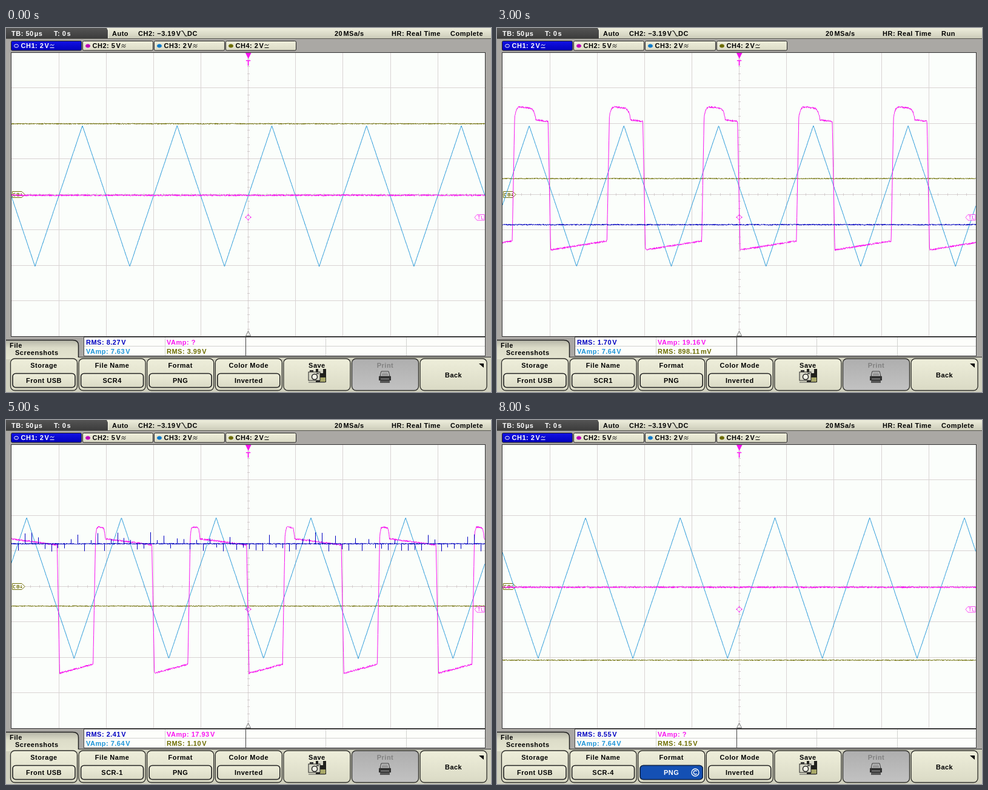
Animation, 800 px wide and 600 px high, one loop 9000 ms. Source, as an HTML page:

```html
<!DOCTYPE html>
<html lang="en">
<head>
<meta charset="utf-8">
<title>Oscilloscope PWM sweep</title>
<style>
html, body { margin: 0; width: 100%; height: 100%; overflow: hidden; background: #aaa8a4; }
svg { display: block; width: 800px; height: 600px; }
text { font: bold 11px "Liberation Sans", Arial, sans-serif; letter-spacing: .5px; fill: #000; white-space: pre; }
.mid { text-anchor: middle; }
.white { fill: #fff; }
.dim { fill: #808080; }
.big { font-size: 12.5px; }
.trace { fill: none; stroke-linejoin: round; }
.state { visibility: hidden; animation: show 9s step-end infinite; }
@keyframes show {
  0% { visibility: visible; }
  11.1111%, 100% { visibility: hidden; }
}
</style>
</head>
<body>
<svg id="scope" viewBox="0 0 800 600">
  <defs>
    <linearGradient id="beige" x2="0" y2="1">
      <stop offset="0" stop-color="#eeeeda"/><stop offset="1" stop-color="#dadac5"/>
    </linearGradient>
    <linearGradient id="tab" x2="0" y2="1">
      <stop offset="0" stop-color="#b4b4a6"/><stop offset=".4" stop-color="#dcdcc8"/><stop offset="1" stop-color="#e4e4d0"/>
    </linearGradient>
    <linearGradient id="bar" x2="0" y2="1">
      <stop offset="0" stop-color="#eeeedc"/><stop offset="1" stop-color="#ccccb9"/>
    </linearGradient>
    <linearGradient id="dark" x2="0" y2="1">
      <stop offset="0" stop-color="#545454"/><stop offset="1" stop-color="#3c3c3c"/>
    </linearGradient>
    <linearGradient id="blue" x2="0" y2="1">
      <stop offset="0" stop-color="#1212e4"/><stop offset="1" stop-color="#0000bc"/>
    </linearGradient>
    <linearGradient id="off" x2="0" y2="1">
      <stop offset="0" stop-color="#aeaeae"/><stop offset="1" stop-color="#c2c2c2"/>
    </linearGradient>
    <clipPath id="plot"><path d="M9 41H790V508H9Z"/></clipPath>
  </defs>
</svg>
<script>
const BLUE = '#0000c0', PINK = '#f814f0', CYAN = '#1c94d8', OLIVE = '#6c6c00';
const LEFT = 9, RIGHT = 790, TOP = 40, DIV_X = 78.125, DIV_Y = 58.5;
const PERIOD = 2 * DIV_X, EDGE = 87;      // EDGE: a triggered falling edge
const PEAK_Y = 161, SWING = 232;          // triangle carrier

let seed = 7;
function rand() {
  seed = (seed * 1664525 + 1013904223) >>> 0;
  return seed / 4294967296;
}
const mod = (a, b) => ((a % b) + b) % b;
const clamp = (v, lo, hi) => Math.min(hi, Math.max(lo, v));
const mix = (a, b, t) => a + (b - a) * t;
const voltsToY = v => 274.5 - v * DIV_Y / 2;
const showVolts = v => Math.abs(v) < 1
  ? (Math.abs(v) * 1000).toFixed(2) + '_mV' : Math.abs(v).toFixed(2) + '_V';

// "_" stands for a narrow gap
const label = (x, y, s, cls = '', fill = '') =>
  `<text x="${x}" y="${y}" class="${cls}"${fill && ` style="fill:${fill}"`}>` +
  s.split('_').map((part, i) => i ? `<tspan dx="1.2">${part}</tspan>` : part).join('') + '</text>';
const rect = (x, y, w, h, fill, extra = '') =>
  `<rect x="${x}" y="${y}" width="${w}" height="${h}" fill="${fill}" ${extra}/>`;
const line = (d, stroke, width = 1, extra = '') =>
  `<path d="${d}" fill="none" stroke="${stroke}" stroke-width="${width}" ${extra}/>`;

function trace(fn, color, noise) {
  let d = '';
  for (let x = LEFT; x <= RIGHT; x += .4) {
    const y = fn(x) + (rand() * 2 - 1) * noise;
    d += (d ? 'L' : 'M') + x.toFixed(1) + ' ' + y.toFixed(1);
  }
  return `<path class="trace" d="${d}" stroke="${color}"/>`;
}

const level = y => () => y;

function triangle(peak) {
  return x => {
    const p = mod(x - peak, PERIOD);
    return PEAK_Y + SWING * Math.min(p, PERIOD - p) / DIV_X;
  };
}

// Time from the carrier's peak to where it crosses the control level
const crossing = y => (y - PEAK_Y) / SWING * DIV_X;

// AC-coupled comparator output: low with droop, rise, high with an early kick, fall
function pulse(step, controlY) {
  const fallEnd = 1.5, fall = PERIOD - 2.7;
  const top = PERIOD - 2 * crossing(controlY) + 1.7 - .85 * step, rise = top - 4;
  const duty = (fall - top) / PERIOD, mean = 283;
  const kick = 25.5 + 9.5 * step, kickHeight = clamp((kick - 6) * 2, 0, 18);
  const low = p => mean + 214 * duty * (1 - .0021 * (p - rise / 2));
  const high = p => {
    const u = (p - top) / kick;
    const bump = u < 1 ? kickHeight * (1 - Math.pow(2 * u - 1, 6)) : 0;
    return mean - 205 * (1 - duty) + .13 * (p - (top + fall) / 2) - bump;
  };
  return x => {
    const p = mod(x - EDGE - fallEnd, PERIOD) + fallEnd;
    if (p < rise) return low(p);
    if (p < top) return mix(low(rise), high(top), (p - rise) / (top - rise));
    if (p < fall) return high(p);
    return mix(high(fall), low(fallEnd), (p - fall) / (PERIOD + fallEnd - fall));
  };
}

function spikes(y) {
  let d = '';
  for (let x = 20.5; x < RIGHT; x += 10.9) {
    const h = rand() < .5 ? -6 - 14 * rand() ** 2 : 6 + 7 * rand();
    d += `M${Math.floor(x) + .5} ${y}v${h.toFixed(1)}`;
  }
  return line(d, BLUE);
}

// Shown readings for steps 4 to -4: CH1 volts, CH4 volts, CH2 amplitude
const readings = [
  [-8.27, 3.99, '?'], [-6.2, 3.01, '18.69_V'], [-4.12, 2.04, '18.91_V'],
  [-1.7, .89811, '19.16_V'], [.3462, -.11735, '18.41_V'], [2.41, -1.1, '17.93_V'],
  [4.42, -2.09, '17.90_V'], [6.49, -3.12, '17.88_V'], [8.55, -4.15, '?'],
];

function topBar() {
  let s = rect(0, 0, 800, 17, 'url(#bar)') + line('M0 17.5H800', '#55554e') +
    '<path d="M0 0H166L168 4V17H0Z" fill="url(#dark)"/>' + line('M168.5 0V17', '#f8f8ec') +
    label(9, 13, 'TB: 50_µs', 'white') + label(79, 13, 'T: 0_s', 'white') + label(175, 13, 'Auto') +
    label(218, 13, 'CH2: −3.19_V') + line('M289 5H291.5L296 13H299', '#000', 1.2) + label(299, 13, 'DC') +
    label(542, 13, '20_MSa/s') + label(636, 13, 'HR: Real Time');
  const channels = [['2', '#fff'], ['5', '#c000b8'], ['2', '#0878c8'], ['2', OLIVE]];
  channels.forEach(([volts, dot], i) => {
    const x = 8.5 + i * 118, ink = i ? '#000' : '#fff';
    const wave = y => `M${x + 64} ${y}q2 -3 3.5 -1t3.5 -1`;
    const under = i % 3 ? wave(32) : `M${x + 64} 32.5h7`;
    s += rect(x, 21.5, 116, 15.5, i ? 'url(#beige)' : 'url(#blue)', 'rx="2" stroke="#222"') +
      `<ellipse cx="${x + 8.5}" cy="29.5" rx="3.5" ry="2.6" fill="${i ? dot : 'none'}" stroke="${dot}"/>` +
      label(x + 16, 33, `CH${i + 1}: ${volts}_V`, '', ink) + line(wave(29) + under, ink);
  });
  return s;
}

function grid() {
  let d = '', ticks = '';
  for (let i = 1; i < 10; i++) d += `M${Math.floor(LEFT + i * DIV_X) + .5} 41V508`;
  for (let i = 1; i < 8; i++) d += `M9 ${Math.floor(TOP + i * DIV_Y) + .5}H790`;
  for (let i = 1; i < 40; i++) ticks += `M398 ${Math.floor(TOP + i * DIV_Y / 5) + .5}h4`;
  for (let i = 1; i < 50; i++) ticks += `M${Math.floor(LEFT + i * DIV_X / 5) + .5} 272.5v4`;
  return rect(8.5, 40.5, 782, 468, '#fbfefb', 'stroke="#333"') + line(d, '#d9d3d3') + line(ticks, '#d0caca');
}

function markers() {
  return '<path d="M395 41H404.5L399.7 51Z" fill="#f814f0"/>' + label(395.7, 62, 'T', 'big', PINK) +
    line('M395.5 507.5L399.5 499.5L403.5 507.5Z', '#777') + '<g opacity=".75">' +
    line('M399.5 307.5L404 312L399.5 316.5L395 312ZM394 312h3M402 312h3M399.5 306v3M399.5 315v3', PINK) +
    `<path d="M789 307.5H777L773 312.2L777 317H789Z" fill="#fff" stroke="${PINK}"/>` +
    line('M778 309.5h4.5M780.2 309.5v5.5M784.5 309.5v5.5h3', PINK) + '</g>';
}

function groundTag() {
  return `<path d="M10.5 269.5H26L31 274.5L26 279.5H10.5Z" fill="#fff" stroke="${OLIVE}"/>` +
    line('M15.5 272.5h-3v4.5h3M18 272.5h3.5v4.5h-3.5ZM18 274.7h3.5M25 272v5M23.5 275l1.5 2l1.5 -2', OLIVE);
}

function readoutPanel() {
  return rect(128.5, 509.5, 662, 31, '#fdfefb', 'stroke="#444"') +
    line('M129 524.5H790M262.5 510V540M527.5 510V540M660.5 510V540', '#d2d2d0') +
    line('M395.5 510V540', '#444');
}

function saveIcon() {
  return rect(511, 562, 17, 22, '#20201c') + rect(515, 562, 8, 7, '#d8d8c8') + rect(518, 576, 9, 7, '#a9a968') +
    rect(499, 567, 19, 14, '#d8d8c8', 'stroke="#222"') + rect(501, 564, 6, 3, '#333') +
    '<circle cx="509" cy="575" r="4.5" fill="#f4f4e8" stroke="#222" stroke-width="1.5"/>' +
    rect(512, 568.5, 4, 2, '#444') + line('M499 584H526', '#555');
}

function printIcon() {
  return '<path d="M619 566H631L633 574H617Z" fill="#ccc" stroke="#333"/>' +
    line('M620 569h10M619.5 571.5h11', '#555') + rect(615, 574, 20, 7, '#333') +
    rect(617, 581, 16, 4, '#555') + line('M618 578.5H632', '#aaa');
}

function bottomPanel() {
  let s = rect(0, 542, 800, 58, '#d0d0be') + line('M119 542.5H800', '#333') +
    '<path d="M0 514.5H110Q119.5 514.5 119.5 523V546H0Z" fill="url(#tab)"/>' +
    line('M0 514.5H110Q119.5 514.5 119.5 523V543', '#222', 1.5) +
    label(6, 527, 'File') + label(15, 539, 'Screenshots');
  const buttons = [['Storage', 'Front USB'], ['File Name', ''], ['Format', 'PNG'], ['Color Mode', 'Inverted'],
    ['Save'], ['Print'], ['Back']];
  buttons.forEach(([title, value], i) => {
    const x = 7.5 + i * 112.6, mid = x + 55;
    s += rect(x, 545, 110, 52.5, i === 5 ? 'url(#off)' : 'url(#beige)', 'rx="7" stroke="#2c2c28" stroke-width="1.3"') +
      label(mid, i === 6 ? 576 : 560, title, i === 5 ? 'mid dim' : 'mid');
    if (value !== undefined)
      s += rect(x + 3.5, 569.5, 103, 23, 'url(#beige)', 'rx="5" stroke="#222" stroke-width="1.6"') +
        label(mid, 585, value, 'mid');
  });
  return s + saveIcon() + printIcon() + '<path d="M780 553H788V560Z" fill="#000"/>';
}

function pickedFormat() {
  return rect(236.2, 569.5, 103, 23, '#1450b4', 'rx="5" stroke="#102850" stroke-width="1.6"') +
    label(287.7, 585, 'PNG', 'mid white') +
    '<circle cx="327" cy="581" r="6" fill="#1450b4" stroke="#fff" stroke-width="1.3"/>' +
    line('M329.5 579a3 3 0 1 0 0 4', '#fff', 1.4);
}

function drawState([v1, v4, amp2], i) {
  const step = 4 - i, y1 = voltsToY(v1), y4 = voltsToY(v4);
  const locked = Math.abs(step) < 4;
  const freePeak = step > 0 ? 126 : 146;
  const peak = locked ? EDGE - crossing(y4) - 4.15 - .37 * step : freePeak;
  return `<g class="state" style="animation-delay:${i - readings.length}s"><g clip-path="url(#plot)">` +
    trace(level(y4), OLIVE, .9) +
    trace(triangle(peak), CYAN, .4) +
    trace(locked ? pulse(step, y4) : level(275.7), PINK, 1.5) +
    trace(level(y1), BLUE, 1.1) +
    (step < 0 ? spikes(y1) : '') + '</g>' +
    label(132, 522, 'RMS: ' + showVolts(v1), '', BLUE) +
    label(265, 522, 'VAmp: ' + amp2, '', PINK) +
    label(132, 537, `VAmp: ${step > 1 ? 7.63 : 7.64}_V`, '', CYAN) +
    label(265, 537, 'RMS: ' + showVolts(v4), '', OLIVE) +
    label(733, 13, step === 1 ? 'Run' : 'Complete') +
    label(175.1, 585, 'SCR' + step, 'mid') +
    (step === -4 ? pickedFormat() : '') + '</g>';
}

document.getElementById('scope').insertAdjacentHTML('beforeend',
  topBar() + grid() + groundTag() + readoutPanel() + bottomPanel() +
  readings.map(drawState).join('') + markers());
</script>
</body>
</html>
```
